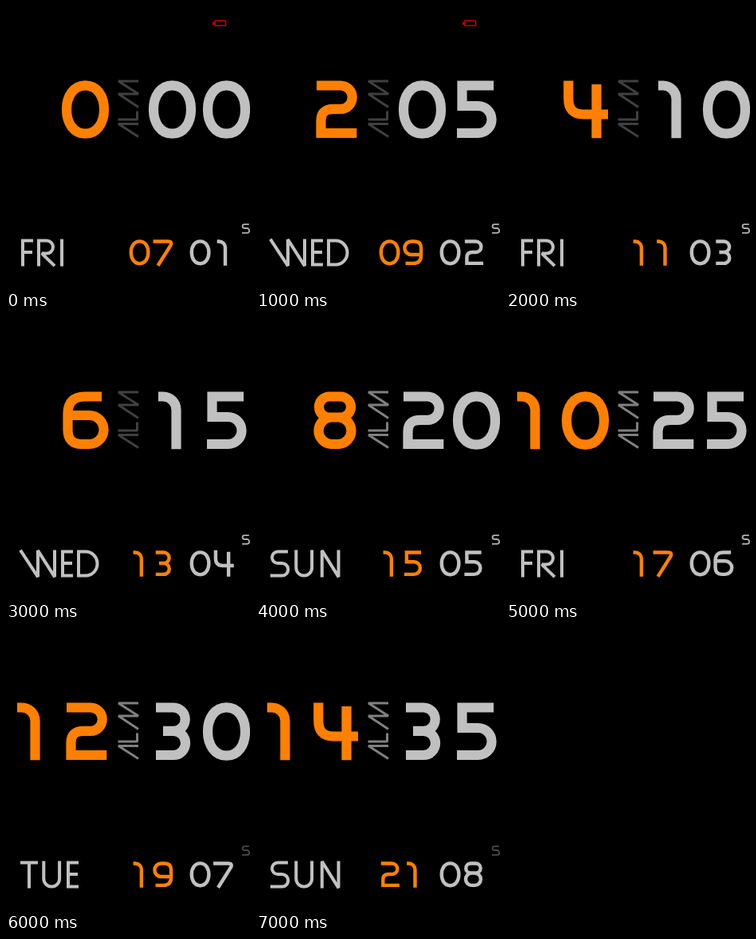
Write an HTML page that moves like this. It is 306 px wide and 354 px high and loops after 8 s.

```html
<!DOCTYPE html>
<html lang="en">
<head>
<meta charset="utf-8">
<title>Watch face</title>
<style>
html, body { margin: 0; width: 100%; height: 100%; overflow: hidden; background: #000; }
svg { display: block; width: 306px; height: 354px; }
path { fill: none; }
</style>
</head>
<body>
<svg id="face" viewBox="0 0 306 354" role="img">
  <g id="battery">
    <rect x="262" y="18.5" width="13.5" height="6" fill="none" stroke="#c80000" stroke-width="1.6"/>
    <rect x="259" y="20" width="2.5" height="3.5" fill="#c80000"/>
  </g>
  <path id="alarm" stroke-width="3" stroke-linejoin="bevel"
    d="M166 163.5L141 147.5H166M140.5 142H164.5V131.5M166 126.5L141 110H166L141 94H166"/>
  <path id="sec" stroke-width="1.8"
    d="M304.8 273.2H299A2.4 2.4 0 0 0 299 278H302.2A2.9 2.9 0 0 1 302.2 283.8H296"/>
  <g id="digits"></g>
  <g id="day" stroke="#c0c0c0" stroke-width="4" stroke-miterlimit="2"></g>
</svg>
<script>
const ORANGE = '#ff8000', GREY = '#c0c0c0';
const STEP = 1000, COUNT = 8;
const DAYS = ['FRI', 'WED', 'FRI', 'WED', 'SUN', 'FRI', 'TUE', 'SUN'];

// Digit strokes in a 59 x 73 cell
const DIGITS = [
  'M29.5 6.3C44 6.3 53 19.5 53 36.5S44 66.7 29.5 66.7S6 53.5 6 36.5S15 6.3 29.5 6.3Z',
  'M12 6.5H18A16.5 16.5 0 0 1 34.5 23V72.3',
  'M6 6.5H36A14.7 14.7 0 0 1 36 35.9H27Q11.5 35.9 11.5 50V66H56.3',
  'M9 6.5H31A14.7 14.7 0 0 1 31 35.9H18M31 35.9A15 15 0 0 1 31 66H9',
  'M8.3 .5V23Q8.3 42.5 27 42.5H58M43.5 5V72.3',
  'M51 6.5H11.5V32H31.5A17 17 0 0 1 31.5 66H5',
  'M7.5 30H34.5A18 18 0 0 1 34.5 66H25Q7.5 66 7.5 48V28Q7.5 6.5 29 6.5H50',
  'M2 6.5H42Q56 6.5 49 18L15 72.3',
  'M22 6.5H36A13 13 0 0 1 36 32.5H22A13 13 0 0 1 22 6.5ZM24 32.5H34A16.8 16.8 0 0 1 34 66H24A16.8 16.8 0 0 1 24 32.5Z',
  'M51 42.5H24A18 18 0 0 1 24 6.5H33.5Q51 6.5 51 24.5V44.5Q51 66 29.5 66H8.5'
];

// Letter: [advance, strokes], 34 high
const LETTERS = {
  F: [20, 'M16 2H3V34M3 16.5H15'],
  R: [29, 'M3 34V2H13A8 8 0 0 1 13 18H7L23 33.5'],
  I: [10, 'M3 0V34'],
  W: [50, 'M0 0L22 33.5V.5L43 33.5V0'],
  E: [20, 'M16 2H3V32H16M3 16.5H15'],
  D: [30, 'M3 2H12A14.5 15 0 0 1 12 32H3Z'],
  S: [30, 'M22 2H9.3A7.2 7.2 0 0 0 9.3 16.4H14.5A7.8 7.8 0 0 1 14.5 32H0'],
  U: [30, 'M2.3 0V22A9.9 10 0 0 0 22.1 22V0'],
  N: [30, 'M4.8 34V.5L25.5 33.5V0'],
  T: [27, 'M0 2H22M11 2V34']
};

const $ = id => document.getElementById(id);
const pad = n => String(n).padStart(2, '0');

function drawNumber(text, x, y, scale, pitch, color, weight) {
  return [...text].map((c, i) => c === ' ' ? '' :
    `<path d="${DIGITS[c]}" stroke="${color}" stroke-width="${weight}" ` +
    `transform="translate(${x + i * pitch} ${y}) scale(${scale})"/>`).join('');
}

function drawWord(word) {
  let x = 18;
  return [...word].map(c => {
    const [advance, d] = LETTERS[c];
    const out = `<path d="${d}" transform="translate(${x} 291.6)"/>`;
    x += advance;
    return out;
  }).join('');
}

function render(i) {
  const hour = String(2 * i).padStart(2, ' '), minute = pad(5 * i);
  const date = pad(7 + 2 * i), month = pad(1 + i);
  $('digits').innerHTML =
    drawNumber(hour, 2, 93, 1, 68, ORANGE, 12.2) +
    drawNumber(minute, 179, 93, 1, 68, GREY, 12.2) +
    drawNumber(date, 154, 291.5, 0.46, 29.6, ORANGE, 9.6) +
    drawNumber(month, 230, 291.5, 0.46, 29.1, GREY, 9.6);
  $('day').innerHTML = drawWord(DAYS[i]);
  $('battery').style.display = i < 2 ? '' : 'none';
  $('alarm').setAttribute('stroke', i < 4 ? '#404040' : '#808080');
  $('sec').setAttribute('stroke', i < 6 ? '#b0b0b0' : '#484848');
  $('face').setAttribute('aria-label', `${hour.trim()}:${minute} ${DAYS[i]} ${date} ${month}`);
}

let shown = -1;
function tick() {
  const i = Math.floor(performance.now() / STEP) % COUNT;
  if (i !== shown) render(shown = i);
  requestAnimationFrame(tick);
}
tick();
</script>
</body>
</html>
```
